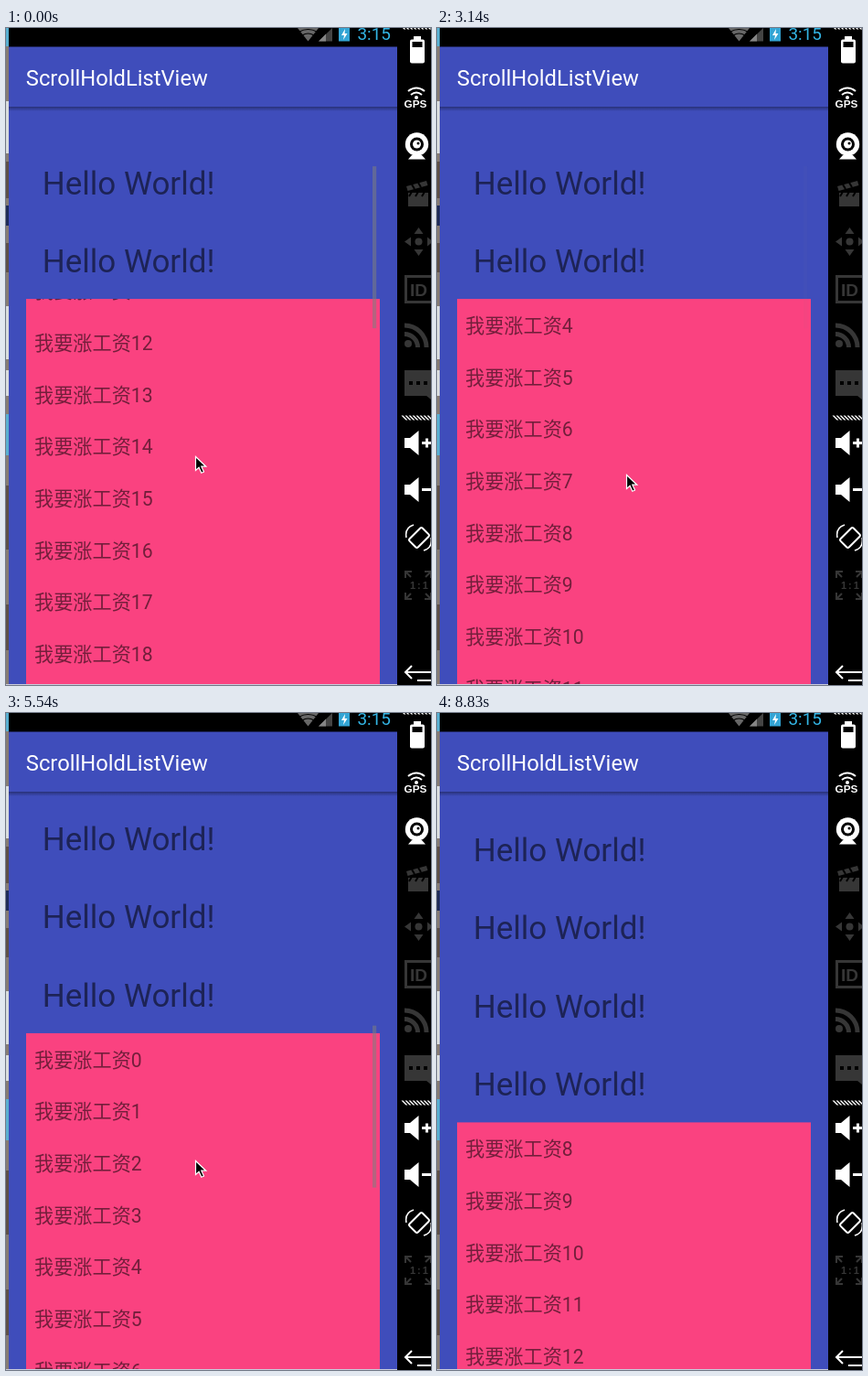
Animation of 465x718 px, one loop 9280 ms. Source, as an HTML page:

```html
<!DOCTYPE html>
<html lang="zh-CN">
<head>
<meta charset="utf-8">
<title>ScrollHoldListView</title>
<style>
html, body { margin: 0; width: 100%; height: 100%; overflow: hidden; background: #000; }
svg { display: block; }
text { font-family: Roboto, "Noto Sans CJK SC", "Noto Sans CJK", sans-serif; }
.hello { font-size: 35px; fill: rgba(0,0,0,.54); }
.item { font-size: 21.15px; fill: rgba(0,0,0,.54); }
.pink { fill: #fa4280; }
.on { fill: #fff; }
.off { fill: #363636; }
.line { fill: none; stroke: #fff; stroke-width: 2; }
.dim { fill: none; stroke: #363636; stroke-width: 3; }
.label { font-family: "Liberation Sans", sans-serif; font-weight: bold; }
</style>
</head>
<body>
<svg id="stage" width="465" height="718" viewBox="0 0 465 718">
  <defs>
    <linearGradient id="shade" x2="0" y2="1">
      <stop stop-color="#000" stop-opacity=".36"/>
      <stop offset="1" stop-color="#000" stop-opacity="0"/>
    </linearGradient>
  </defs>

  <!-- desktop sliver -->
  <g>
    <path fill="#857b74" d="M0 0h3v718H0z"/>
    <path fill="#58aed0" d="M0 0h3v20H0zM0 422h3v45H0z"/>
    <path fill="#d9dcdd" d="M0 80h3v57H0zM0 304h3v58H0zM0 374h3v28H0z"/>
    <path fill="#1f2c58" d="M0 194h3v22H0z"/>
    <path fill="#5d5048" d="M0 146h3v40H0zM0 235h3v32H0zM0 500h3v70H0zM0 630h3v50H0z"/>
  </g>

  <!-- phone -->
  <path fill="#3f4dbb" d="M3 20h425v698H3z"/>
  <path d="M3 0h425v20.500H3z"/>
  <path fill="#676767" d="M319 0h23l-11.500 14.500z"/>
  <path fill="none" stroke="#000" stroke-width="1.200" d="M321 4q9.500-5 19 0M324 8q6.500-4 13 0"/>
  <path fill="#444" d="M342 14.500L357 0v14.500z"/>
  <path fill="#858585" d="M342 14.500l8-8v8z"/>
  <path fill="#33a5d5" d="M364 0h12v14.500h-12z"/>
  <path class="on" d="M371 1l-4 7h3l-1 5 4.500-7h-3z"/>
  <text x="384.500" y="13" font-size="18.900" fill="#33b5e5">3:15</text>
  <text x="21.800" y="63" font-size="23.750" fill="#fff">ScrollHoldListView</text>
  <rect x="3" y="86" width="425" height="5" fill="url(#shade)"/>

  <svg id="view" x="22" y="105" width="387" height="622"><g id="page"></g></svg>
  <rect id="thumb" x="401" width="4.200" height="177" fill="#7f7f7f"/>
  <path fill="#c9cbdb" d="M0 717h428v1H0z"/>

  <!-- emulator toolbar -->
  <path d="M428 0h37v718h-37z"/>
  <g transform="skewX(45)">
    <path class="line" stroke-dasharray="2 2" d="M434 .5h34"/>
    <path class="line" style="stroke-width:5" stroke-dasharray="2 2" d="M9 426h34"/>
  </g>
  <path class="on" d="M446 9h8v4h-8z"/>
  <rect class="on" x="442" y="12.500" width="16" height="26" rx="2"/>
  <path d="M444.500 15h11v6h-11z"/>
  <path class="line" d="M440 69q9-7 18 0M443 73q6-5 12 0"/>
  <circle class="on" cx="449" cy="76" r="2"/>
  <text class="on label" x="435.500" y="87" font-size="11.800">GPS</text>
  <circle class="on" cx="449.500" cy="127" r="12.700"/>
  <circle cx="449.500" cy="127" r="7.500"/>
  <circle class="on" cx="449.500" cy="127" r="4.500"/>
  <circle cx="451" cy="126" r="1.500"/>
  <path class="on" d="M444 139h11l4 4.500h-19z"/>
  <path class="off" d="M440 180h22v15h-22zM438 173l22-6 1.500 5-22 6z"/>
  <path fill="none" stroke="#000" stroke-width="2" d="M444 171l3 5M451 169l3 5M444 179l-3 5M451 179l-3 5M458 179l-3 5"/>
  <circle class="off" cx="451.500" cy="233.500" r="4"/>
  <path class="off" d="M451.500 218l5 7h-10zM451.500 249l5-7h-10zM436 233.500l7-5v10zM467 233.500l-6-5v10z"/>
  <path class="dim" d="M437.500 271.500h32v28h-32z"/>
  <text class="off label" x="442" y="293" font-size="19">ID</text>
  <circle class="off" cx="440" cy="345" r="4"/>
  <path class="dim" style="stroke-width:5" d="M436 334.500a14.500 14.500 0 0 1 14.500 14.500M436 325a24 24 0 0 1 24 24"/>
  <path class="off" d="M436 374h29v32l-5-4h-24z"/>
  <path d="M441 386h4v4h-4zM449 386h4v4h-4zM457 386h4v4h-4z"/>
  <path id="speaker" class="on" d="M436 448h6l9.500-8v27l-9.500-8h-6z"/>
  <use href="#speaker" y="51"/>
  <path class="line" style="stroke-width:3" d="M455 453.500h10M460.500 448.500v10M455 504.500h10"/>
  <g transform="rotate(45 452 557)">
    <rect class="line" x="445.500" y="547" width="13" height="20" rx="2"/>
  </g>
  <path class="line" style="stroke-width:1.500" d="M438 557q-2-11 8-14M465 557q2 11-8 14"/>
  <path class="dim" style="stroke-width:2" d="M437 601v-7h7M437 594l6 6M458 594h7v7M465 594l-6 6M437 617v7h7M437 624l6-6M458 624h7v-7M465 624l-6-6"/>
  <text class="off label" x="442" y="613" font-size="11" letter-spacing="2">1:1</text>
  <path class="line" d="M444 697l-7 7 7 7M437 704h28M465 713h-15"/>

  <path id="cursor" stroke="#fff" stroke-width="1.200" d="M.5 .5V15.500l3.600-3.300 2.700 6 2.700-1.200-2.700-5.800h5z"/>
</svg>

<script>
const LOOP = 9280, DP = 425 / 360, TICK = 64 * DP, ROW = 48 * DP;
const ROWS = 20, HELLO = 85.55, LIST_H = 400 * DP, LIST_END = ROWS * ROW - LIST_H;
const VIEW_TOP = 105, VIEW_H = 622;
const PAGE_H = 7 * HELLO + LIST_H + ROWS * ROW, PAGE_END = 826.3 + 10 * TICK;

const $ = id => document.getElementById(id);
function add(parent, tag, attrs, label) {
  const el = document.createElementNS("http://www.w3.org/2000/svg", tag);
  for (const key in attrs) el.setAttribute(key, attrs[key]);
  if (label) el.textContent = label;
  return parent.appendChild(el);
}

function addHellos(y, count) {
  for (let i = 0; i < count; i++)
    add($("page"), "text", { class: "hello", x: 17.7, y: y + i * HELLO + 56.6 }, "Hello World!");
  return y + count * HELLO;
}
function addList(y, height) {
  const box = add($("page"), "svg", { y, width: 387, height });
  add(box, "rect", { class: "pink", width: 387, height });
  const rows = add(box, "g", {});
  for (let i = 0; i < ROWS; i++)
    add(rows, "text", { class: "item", x: 9.1, y: i * ROW + 37 }, "我要涨工资" + i);
  return rows;
}

// Four greetings, a short scrolling list, three greetings, a fully expanded list.
const listY = addHellos(0, 4);
const rows = addList(listY, LIST_H);
addList(addHellos(listY + LIST_H, 3), ROWS * ROW);

// [time, value]: wheel ticks land as hard steps.
const pageSteps = [
  [0, 2], [300, 4], [450, 6], [600, 7], [2550, 2], [3740, 4], [4040, 6], [4190, 8],
  [4490, 11], [4640, 16], [4940, PAGE_END / TICK], [5390, PAGE_END / TICK - 5],
  [5540, PAGE_END / TICK - 10], [5840, 354 / TICK], [6890, 0]
];
const end = LIST_END / TICK;
const listSteps = [
  [0, end], [1200, end - 1], [1350, end - 3], [1500, end - 4], [1950, 2], [2100, 0],
  [2700, 1], [2850, 2], [2990, 3], [3290, 5], [3440, 7], [3590, end],
  [6140, end - 3], [6290, end - 6], [6890, 0],
  [7640, 1], [7940, 2], [8240, 3], [8390, 4], [8540, 5], [8690, 6]
];
const cursorSteps = [
  [0, 207, 468], [900, 212, 400], [1050, 217, 327], [2550, 207, 488], [3290, 207, 489],
  [6890, 351, 583], [8240, 448, 610], [8390, 439, 650], [8540, 430, 700], [8690, 500, 730]
];
const thumbFade = [.55, .55, .55, .2, .04];

const stepAt = (steps, t) => steps.findLast(s => s[0] <= t);
const move = (el, x, y) => el.setAttribute("transform", `translate(${x} ${y})`);

function draw(now) {
  const t = now % LOOP;
  const [since, ticks] = stepAt(pageSteps, t);
  const scroll = ticks * TICK;
  const [, x, y] = stepAt(cursorSteps, t);
  move($("page"), 0, -scroll);
  move(rows, 0, -stepAt(listSteps, t)[1] * TICK);
  move($("cursor"), x, y);
  $("thumb").setAttribute("y", VIEW_TOP + 3.5 + scroll * VIEW_H / PAGE_H);
  $("thumb").setAttribute("opacity", thumbFade[Math.floor((t - since + 12) / 150)] || 0);
}

const start = performance.now();
function frame() {
  draw(performance.now() - start);
  requestAnimationFrame(frame);
}
frame();
</script>
</body>
</html>
```
